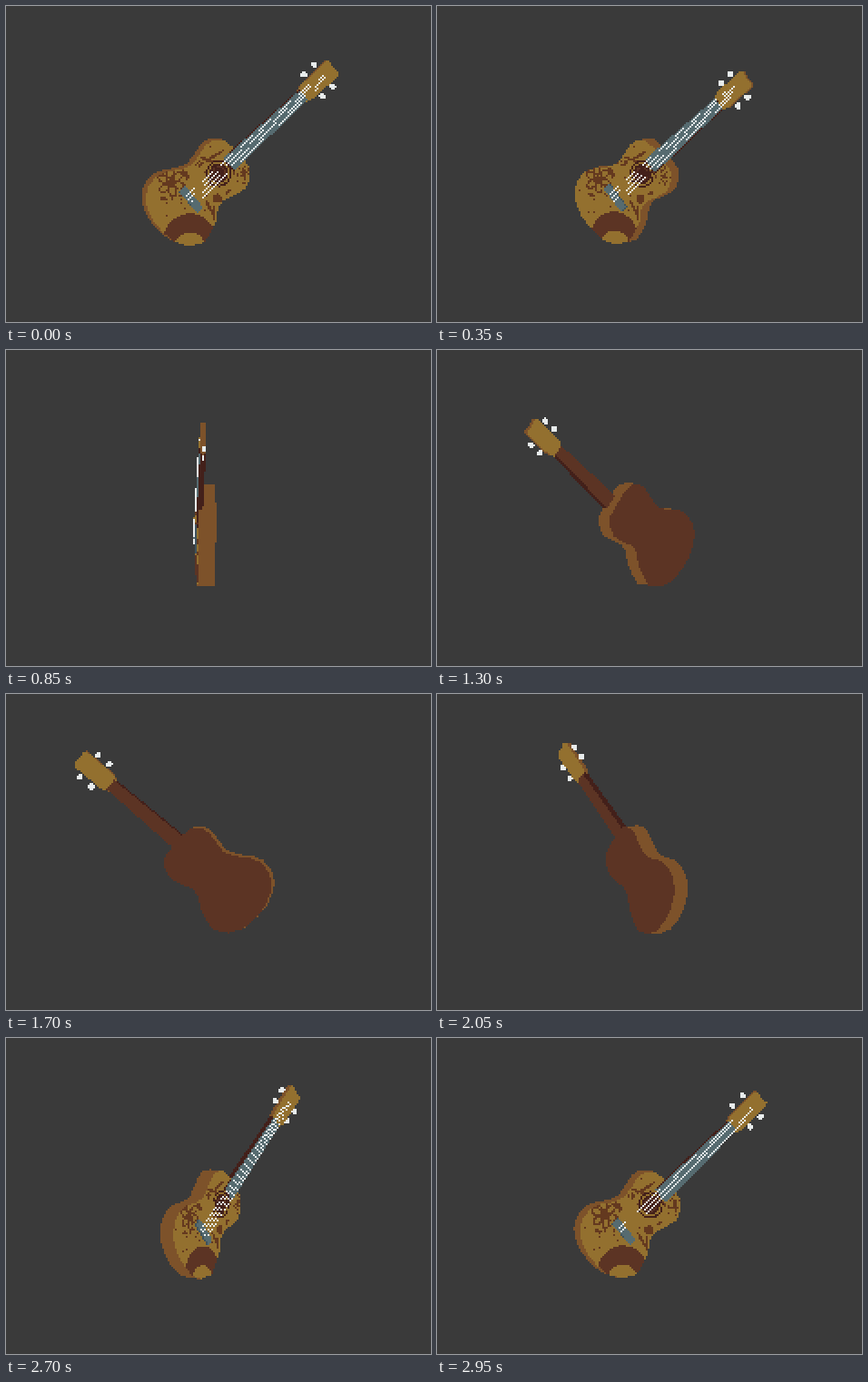
An HTML page with a canvas for the animation above (3 s loop, 468 by 348 pixels).

```html
<!DOCTYPE html>
<html lang="en">
<head>
<meta charset="utf-8">
<title>Spinning ukulele</title>
<style>
  html, body { margin: 0; width: 100%; height: 100%; overflow: hidden; background: #3a3a3a; }
  canvas { display: block; width: 468px; height: 348px; image-rendering: pixelated; }
</style>
</head>
<body>
<canvas id="stage" width="234" height="174"></canvas>
<script>
const W = 234, H = 174, LOOP = 3000, STEP = 50;
const AXIS = 220.2, PIVOT = 90, TILT = 0.115, ROLL = 0.013;
const ctx = document.getElementById('stage').getContext('2d');
const image = ctx.createImageData(W, H);
const pixels = new Uint32Array(image.data.buffer);
const face = new Uint8Array(W * H);

// Hex RGB to the little-endian order of the pixel buffer
const rgb = h => (0xff000000 | (h & 255) << 16 | (h & 0xff00) | h >> 16) >>> 0;
const BACKDROP = rgb(0x3a3a3a), GOLD = rgb(0x93702f), SIDE = rgb(0x7d522a),
  BACK = rgb(0x5c3424), DARK = rgb(0x43201a), INK = rgb(0x64391f),
  SLATE = rgb(0x566b70), BRIDGE = rgb(0x566b70), STEEL = rgb(0x3f525c), WHITE = rgb(0xe8ecec);

let cos = 1, sin = 0;

// Spin about a slightly tilted and rolled upright axis
function project([x, y, z]) {
  const sx = x * cos - z * sin;
  const near = x * sin + z * cos;
  return [(AXIS + sx + ROLL * (y - PIVOT)) / 2, (y + TILT * near - ROLL * sx) / 2];
}

// Hard-edged polygon fill. mode 1 marks the soundboard, mode 2 paints only on it.
function fill(points, color, mode = 0) {
  const p = points.map(project);
  const ys = p.map(q => q[1]);
  const top = Math.max(0, Math.ceil(Math.min(...ys) - 0.5));
  const end = Math.min(H, Math.ceil(Math.max(...ys) - 0.5));
  for (let row = top; row < end; row++) {
    const y = row + 0.5, hits = [];
    p.forEach(([x0, y0], i) => {
      const [x1, y1] = p[(i + 1) % p.length];
      if (y0 <= y !== y1 <= y) hits.push(x0 + (y - y0) / (y1 - y0) * (x1 - x0));
    });
    hits.sort((a, b) => a - b);
    for (let i = 0; i + 1 < hits.length; i += 2) {
      const stop = Math.min(W, Math.ceil(hits[i + 1] - 0.5));
      for (let x = Math.max(0, Math.ceil(hits[i] - 0.5)); x < stop; x++) {
        const at = row * W + x;
        if (mode === 2 && !face[at]) continue;
        if (mode === 1) face[at] = 1;
        pixels[at] = color;
      }
    }
  }
}

const lift = (shape, z) => shape.map(([x, y]) => [x, y, z]);

function sides(shape, z0, z1, color) {
  shape.forEach(([x, y], i) => {
    const [u, v] = shape[(i + 1) % shape.length];
    fill([[x, y, z0], [u, v, z0], [u, v, z1], [x, y, z1]], color);
  });
}

function prism(shape, z0, z1, edge, front, back) {
  sides(shape, z0, z1, edge);
  fill(lift(shape, cos > 0 ? z1 : z0), cos > 0 ? front : back);
}

// Point t along the strings from the bridge, w across them
const along = (t, w) => [-22 + 0.764 * t + 0.645 * w, 210.8 - 0.645 * t + 0.764 * w];
const strip = (t0, w0, t1, w1) => [along(t0, -w0), along(t1, -w1), along(t1, w1), along(t0, w0)];

function oval(cx, cy, rx, ry = rx, turn = 0, n = 20) {
  const c = Math.cos(turn), s = Math.sin(turn);
  return Array.from({ length: n }, (_, i) => {
    const a = i / n * 2 * Math.PI, x = rx * Math.cos(a), y = ry * Math.sin(a);
    return [cx + x * c - y * s, cy + x * s + y * c];
  });
}

const body = [
  [16, 147], [4, 147], [-4, 152], [-12, 163], [-20, 173], [-32, 177.5], [-48, 179],
  [-61, 184], [-70, 195], [-73, 206], [-72, 217], [-65, 233], [-54, 246], [-41, 257],
  [-25, 262.3], [-7, 259], [1, 247], [7, 235], [9, 222], [15, 214], [29, 208],
  [41, 201.5], [46, 190.5], [46, 179], [38, 168.5], [27, 155.5]
];
const head = [
  along(167, -7.5), along(175, -10.5), along(213, -11), along(216, -8), along(214.5, 0),
  along(216, 8), along(213, 11), along(175, 10.5), along(167, 7.5)
];
const neck = strip(71, 8.5, 170, 6.5);
const board = strip(57, 9.2, 169, 7);
const bridge = strip(-4.5, 16, 4.5, 16);
const hole = along(42.5, 0);

// Printed ornament: [shape, color] pairs painted in order
const art = [];
const ink = (shape, color = INK) => art.push([shape, color]);

function flower(x, y, r, petals) {
  for (let i = 0; i < petals; i++) {
    const a = i / petals * 2 * Math.PI + 0.4;
    const px = x + r * Math.cos(a), py = y + r * Math.sin(a);
    ink(oval(px, py, r * 0.66, r * 0.48, a));
    ink(oval(px, py, r * 0.44, r * 0.28, a), GOLD);
  }
  ink(oval(x, y, r * 0.4));
}

let seed = 11;
function random() {
  seed = (seed * 16807) % 2147483647;
  return seed / 2147483647;
}
for (let i = 0; i < 54; i++) {
  ink(oval(-68 + 112 * random(), 152 + 78 * random(), 1.3, 1.3, 0.8, 4));
}
flower(-44, 191, 10, 6);
flower(-31, 204, 5, 5);
flower(39, 185, 5, 5);
ink(oval(-58, 181, 6, 2.2, -0.5));
ink(oval(-27, 183, 6, 2.5, 0.9));
ink(oval(-52, 209, 5, 2, 0.3));
ink(oval(6, 164, 12, 1.6, -0.5));
ink(oval(-2, 168, 10, 1.5, 0.3));
ink(oval(-10, 173, 4, 2, -0.8));
ink(oval(8, 211, 5.5, 5));
ink(oval(0, 222, 12, 1.6, 1.05));
ink(oval(5, 226, 9, 1.4, 1.6));
ink(oval(21, 204, 4, 2, -0.6));
ink(oval(-24, 256, 30), BACK);
ink(oval(-24, 264, 18, 17), GOLD);
ink(oval(...hole, 15), DARK);
ink(oval(...hole, 13), GOLD);
ink(oval(...hole, 11), DARK);
ink(oval(...hole, 8), BACK);
ink(oval(...hole, 6.5), DARK);

function drawHead() {
  const pegs = s => [185, 201].forEach(t =>
    prism(oval(...along(t, 16 * s), 3.3, 3.3, 0.4, 8), 8.5, 11.5, WHITE, WHITE, WHITE));
  const far = sin > 0 ? -1 : 1;
  pegs(far);
  prism(head, 8, 13, SIDE, GOLD, GOLD);
  pegs(-far);
}

function drawNeck() {
  prism(neck, 6.5, 12, DARK, SLATE, BACK);
}

// Strings are thinner than a pixel, so they break into dashes
function drawStrings() {
  [-1, -0.34, 0.34, 1].forEach((k, i) => {
    const reach = i % 3 ? 200 : 186;
    const line = [[-3, 7 * k - 0.45], [reach, 4.6 * k - 0.45], [reach, 4.6 * k + 0.45], [-3, 7 * k + 0.45]];
    prism(line.map(q => along(...q)), 14, 14.3, WHITE, WHITE, WHITE);
  });
}

function draw(angle) {
  cos = Math.cos(angle);
  sin = Math.sin(angle);
  pixels.fill(BACKDROP);
  face.fill(0);
  if (cos < 0) prism(board, 11, 13, DARK, SLATE, DARK);
  if (sin < 0) { drawHead(); drawNeck(); }
  sides(body, -8, 11, SIDE);
  if (sin >= 0) { drawNeck(); drawHead(); }
  if (cos < 0) {
    fill(lift(body, -8), BACK);
  } else {
    fill(lift(body, 11), GOLD, 1);
    art.forEach(([shape, color]) => fill(lift(shape, 11), color, 2));
    prism(board, 11, 13, DARK, SLATE, DARK);
    prism(bridge, 11, 13.5, STEEL, BRIDGE, BRIDGE);
    drawStrings();
  }
  ctx.putImageData(image, 0, 0);
}

function tick() {
  const turn = Math.floor(performance.now() % LOOP / STEP) * STEP / LOOP;
  draw((turn * 360 - 15) * Math.PI / 180);
  requestAnimationFrame(tick);
}
tick();
</script>
</body>
</html>
```
